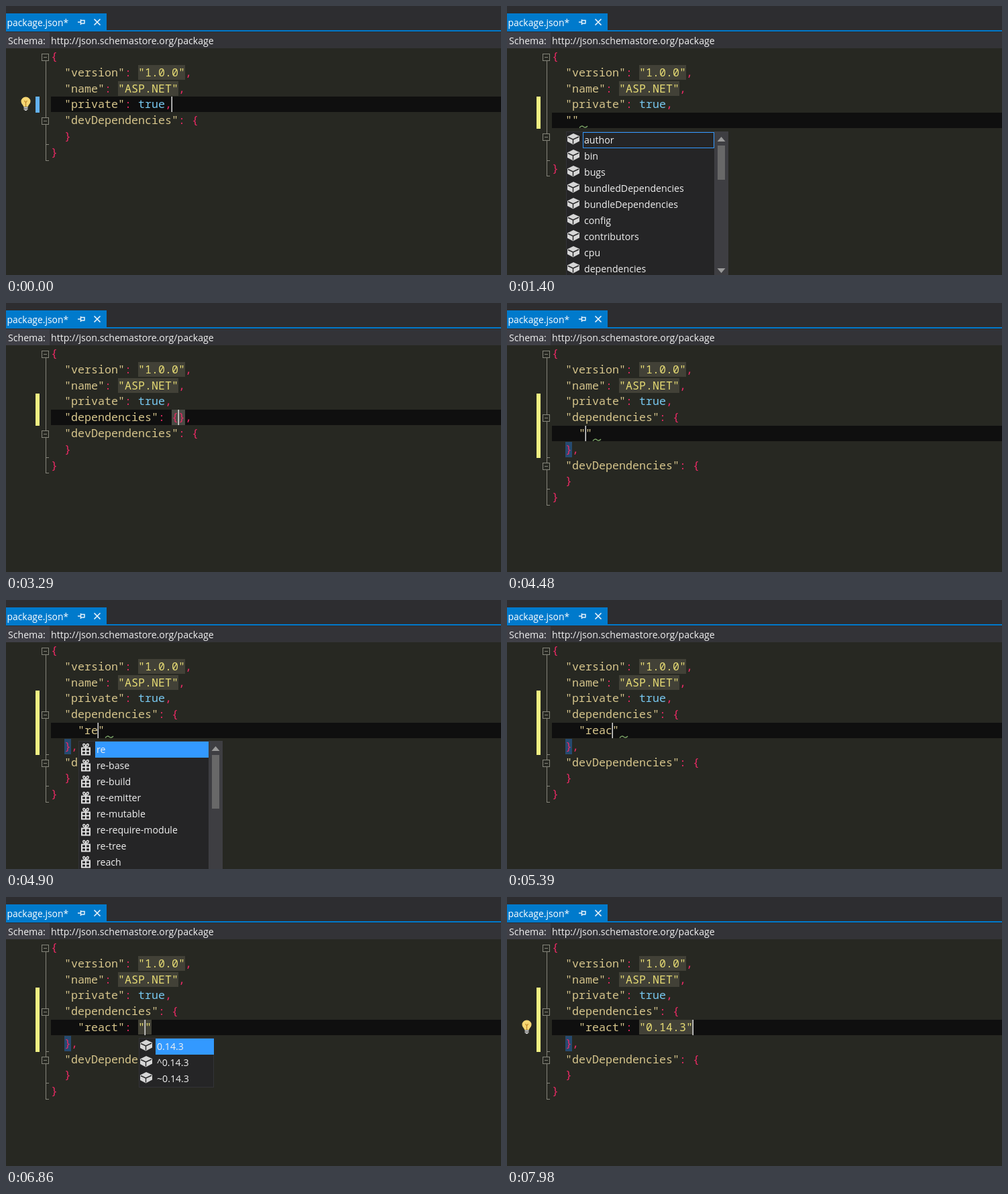
Animation, 738 px wide and 401 px high, one loop 8 s. Source, as an HTML page:

```html
<!DOCTYPE html>
<html lang="en">
<head>
<meta charset="utf-8">
<title>package.json</title>
<style>
html, body { margin: 0; width: 100%; height: 100%; overflow: hidden; background: #272822; }
svg { display: block; width: 738px; height: 401px; }
text { white-space: pre; }
.code { font: 16.667px "Noto Sans Mono", monospace; }
.ui { font: 14.15px "Open Sans", "Noto Sans", sans-serif; fill: #f1f1f1; }
</style>
</head>
<body>
<svg id="stage" viewBox="0 0 738 401" xmlns="http://www.w3.org/2000/svg">
  <rect width="738" height="401" fill="#272822"/>
  <rect width="738" height="63" fill="#2d2d30"/>
  <rect y="11" width="150" height="26" fill="#007acc"/>
  <rect y="36" width="738" height="2" fill="#007acc"/>
  <rect y="39" width="65" height="24" fill="#3f3f46"/>
  <rect x="65" y="39" width="673" height="24" fill="#333337"/>
  <text class="ui" x="1.5" y="29.5" style="font-size:13.9px;fill:#fff">package.json*</text>
  <path d="M107 24h4M111.5 20v8M112 21.5h5v4M112 26h5.5" fill="none" stroke="#e6f2fa" stroke-width="1.5"/>
  <path d="M131.5 19.5l9 9m0-9l-9 9" stroke="#e6f2fa" stroke-width="1.7"/>
  <text class="ui" x="3" y="56.5">Schema:</text>
  <text class="ui" x="67" y="56.5">http://json.schemastore.org/package</text>
  <g id="editor"></g>
</svg>
<script>
(() => {
const LOOP = 8000;
const LEFT = 67, CHAR = 10, LINE = 23.8, ROW = 24;
const COLOR = { key: '#d6c58c', value: '#e6db74', word: '#78c8f0', punct: '#ee2a66' };
const HEAD = ['{', '  "version": "1.0.0",', '  "name": "ASP.NET",', '  "private": true,'];
const TAIL = ['  "devDependencies": {', '  }', '}'];

const list = s => s.split(' ');
const props = { w: 242, col: 2, thumb: 51, items:
  list('author bin bugs bundledDependencies bundleDependencies config contributors cpu dependencies') };
const depProps = { w: 221, col: 2, sel: 2, fill: true, items:
  list('bundledDependencies bundleDependencies dependencies description devDependencies optionalDependencies') };
const packages = { w: 215, thumb: 51, gift: true, items:
  list('async bower browserify express grunt grunt-contrib-copy gulp jquery lodash') };
const rePkgs = { w: 215, col: 4, thumb: 80, gift: true, fill: true, items:
  list('re re-base re-build re-emitter re-mutable re-require-module re-tree reach read') };
const reaPkgs = { w: 270, col: 4, thumb: 120, gift: true, fill: true, items:
  list('rea reach reach-router react react-autocomplete-input reactify reactor read readable-stream') };
const reactPkgs = { w: 297, col: 4, thumb: 158, gift: true, fill: true, items:
  list('react react-0-14-0-rc1 react_custom_select react_datepicker react_explicit_prop_declaration react_generator react_modal react_on_rails react_table') };
const versions = { w: 112, col: 13, items: list('0.14.3 ^0.14.3 ~0.14.3') };
const chosen = { ...versions, fill: true };

const dep = '  "dependencies": ';
const inner = s => [dep + '{', '    ' + s, '  },'];
// caret is a column, or null while blinked off
const typed = (s, extra) => ({ mid: inner(`"${s}"`), caret: 5 + s.length, squig: 6 + s.length, ...extra });

const timeline = [
  [0, { mid: [], row: 3, caret: 18, bulb: true, popup: null, squig: null }],
  [350, { caret: null }],
  [770, { mid: [''], row: 4, caret: 2, bulb: false }],
  [840, { bulb: true }],
  [1260, { mid: ['  ""'], caret: 3, bulb: false, squig: 4 }],
  [1330, { popup: props, caret: null }],
  [1820, { mid: ['  "d"'], caret: 4, squig: 5 }],
  [1890, { mid: ['  "de"'], caret: 5, squig: 6 }],
  [1960, { popup: depProps }],
  [2310, { caret: null }],
  [2450, { popup: null }],
  [2520, { mid: ['  "dependencies"'], caret: 16, squig: 16 }],
  [2590, { mid: [dep], caret: 18, squig: null }],
  [2660, { mid: [dep + '{},'], caret: 19 }],
  [2730, { popup: { ...packages, col: 19 }, caret: null }],
  [3010, { popup: null }],
  [3290, { caret: 19 }],
  [3710, { mid: inner(''), row: 5, caret: 4 }],
  [4200, { caret: null }],
  [4410, typed('')],
  [4550, { popup: { ...packages, col: 4 } }],
  [4690, typed('r', { popup: null })],
  [4830, typed('re')],
  [4900, { popup: rePkgs }],
  [5110, { caret: null }],
  [5250, typed('rea')],
  [5320, { popup: reaPkgs }],
  [5390, typed('reac', { popup: null })],
  [5530, typed('react')],
  [5740, { popup: reactPkgs }],
  [6090, { caret: null }],
  [6160, { mid: inner('"react": ""'), caret: 14, squig: null, popup: null }],
  [6230, { popup: versions }],
  [6510, { caret: null }],
  [6860, { popup: chosen, caret: 14 }],
  [6930, { popup: { ...chosen, tip: 'The latest stable version of the package' } }],
  [7000, { popup: chosen }],
  [7420, { mid: inner('"react": "0.14.3"'), caret: 21, popup: null }],
  [7490, { caret: null }],
  [7840, { bulb: true }],
  [7980, { caret: 21 }]
];
let last = {};
const states = timeline.map(([at, patch]) => (last = { ...last, ...patch, at }));

const colX = c => LEFT + c * CHAR;
const lineY = k => Math.round(64 + LINE * k);
const rect = (x, y, w, h, fill, more = '') =>
  `<rect x="${x}" y="${y}" width="${w}" height="${h}" fill="${fill}" ${more}/>`;
const text = (cls, x, y, s, fill) =>
  `<text class="${cls}" x="${x}" y="${y}"${fill ? ` fill="${fill}"` : ''}>${s}</text>`;
const path = (d, stroke, more = '') => `<path d="${d}" fill="none" stroke="${stroke}" ${more}/>`;
const place = (x, y, s) => `<g transform="translate(${x} ${y})">${s}</g>`;

const cube = '<path d="M-9-4L0-8.5 9-4.5V3L-.5 8-9 3.5Z" fill="#d6d6d6"/>' +
  path('M-8-3L-.5 .5 8-3.5M-.5 .5V7', '#252526', 'stroke-width="1.4"');
const gift = path('M-6-2.5H6V7.5H-6ZM0-3V8M-6 2.5H6', '#e0e0e0', 'stroke-width="2"') +
  path('M0-4C-5-4-5-9-2.5-8.5 -1-8 0-5 0-4 0-5 1-8 2.5-8.5 5-9 5-4 0-4', '#e0e0e0', 'stroke-width="1.5"');
const bulb = '<path d="M-3.5 4C-3.5 1.5-7 0-7-4A7 6.5 0 0 1 7-4C7 0 3.5 1.5 3.5 4Z" fill="#f7d774"/>' +
  '<path d="M-2-5L0-2 2-5M0-2V4" fill="none" stroke="#c08a2c" stroke-width="1.3"/>' +
  rect(-3, 4.5, 6, 2, '#d8d8d8') + rect(-3, 7.2, 6, 1.6, '#b8b8b8') + rect(-1.5, 9, 3, 1, '#d8d8d8');

function codeLine(line, k) {
  let out = '';
  for (const m of line.matchAll(/"[^"]*"|true|[{}:,]/g)) {
    const [s] = m, x = colX(m.index), y = lineY(k);
    const isValue = s[0] === '"' && line.slice(0, m.index).includes(':');
    const kind = isValue ? 'value' : s[0] === '"' ? 'key' : s === 'true' ? 'word' : 'punct';
    if (isValue) out += rect(x, y, s.length * CHAR, 22, '#424137');
    out += text('code', x, y + 17, s, COLOR[kind]);
  }
  return out;
}

function folding(lines) {
  const ink = '#85857a', end = lineY(lines.length) - 1;
  let out = path(`M59.5 ${lineY(0) + 18}V${end}`, ink);
  lines.forEach((line, k) => {
    const y = lineY(k) + 12.5;
    if (line.endsWith('{'))
      out += rect(53.5, y - 5, 10, 10, '#272822', `stroke="${ink}"`) + path(`M56 ${y}h5`, ink);
    if (line.trim().startsWith('}')) out += path(`M59 ${lineY(k + 1) - .5}h5`, ink);
  });
  return out;
}

function braces({ mid }) {
  if (mid.length === 3) return rect(colX(2), lineY(6), CHAR, 23, '#264a70');
  return mid.join('').includes('{}') ? rect(colX(18), lineY(4), 2 * CHAR, 23, '#4a4a44') : '';
}

function popup(p, row) {
  const { w, items, thumb, sel = 0 } = p;
  const x = colX(p.col) + 1, y = Math.round(64 + LINE * (row + 1) + 3.5);
  const h = items.length * ROW + 2, bar = thumb ? 21 : 0, inside = w - 25 - bar;
  let out = rect(x + .5, y + .5, w - 1, h - 1, '#252526', 'stroke="#333337"');
  const sy = y + 1 + sel * ROW;
  out += p.fill ? rect(x + 25, sy, inside, ROW, '#3399ff')
    : rect(x + 25.5, sy + .5, inside - 1, ROW - 1, 'none', 'stroke="#3399ff"');
  items.forEach((s, i) => {
    const iy = y + 1 + i * ROW;
    out += place(x + 11, iy + (p.gift ? 12 : 10.5), p.gift ? gift : cube) + text('ui', x + 27, iy + 17, s);
  });
  if (thumb) {
    const bx = x + w - bar, mid = bx + 10.5;
    out += rect(bx, y, bar, h, '#3e3e42') + rect(bx + 5, y + 21, 11, thumb, '#686868') +
      `<path d="M${mid - 6} ${y + 15}h12l-6-7zM${mid - 6} ${y + h - 14}h12l-6 7z" fill="#999"/>`;
  }
  if (p.tip)
    out += rect(x + w + 2.5, y + .5, 270, 28, '#424245', 'stroke="#4d4d50"') + text('ui', x + w + 7, y + 19, p.tip);
  return out;
}

function draw(s) {
  const lines = [...HEAD, ...s.mid, ...TAIL], y = lineY(s.row), n = s.mid.length;
  let out = rect(LEFT, y, 738 - LEFT, 23, '#0f0f0f');
  out += rect(44, lineY(3), 6, lineY(4 + n) - lineY(3), n ? '#f0f082' : '#63b1ee');
  out += folding(lines) + braces(s) + lines.map(codeLine).join('');
  if (s.bulb) out += place(29.5, y + 11, bulb);
  if (s.squig !== null)
    out += path(`M${colX(s.squig) + 1} ${y + 22.5}q3-4 6-1.5t6-1`, '#7da668', 'stroke-width="1.4"');
  if (s.popup) out += popup(s.popup, s.row);
  if (s.caret !== null) out += rect(colX(s.caret) - .5, y, 1.5, 23, '#dcdcdc');
  return out;
}

const editor = document.getElementById('editor');
let shown = null;
function render(now) {
  const t = now % LOOP;
  const state = states.filter(s => s.at <= t).pop();
  if (state !== shown) editor.innerHTML = draw(shown = state);
}
function tick() {
  render(performance.now());
  requestAnimationFrame(tick);
}
tick();
})();
</script>
</body>
</html>
```
